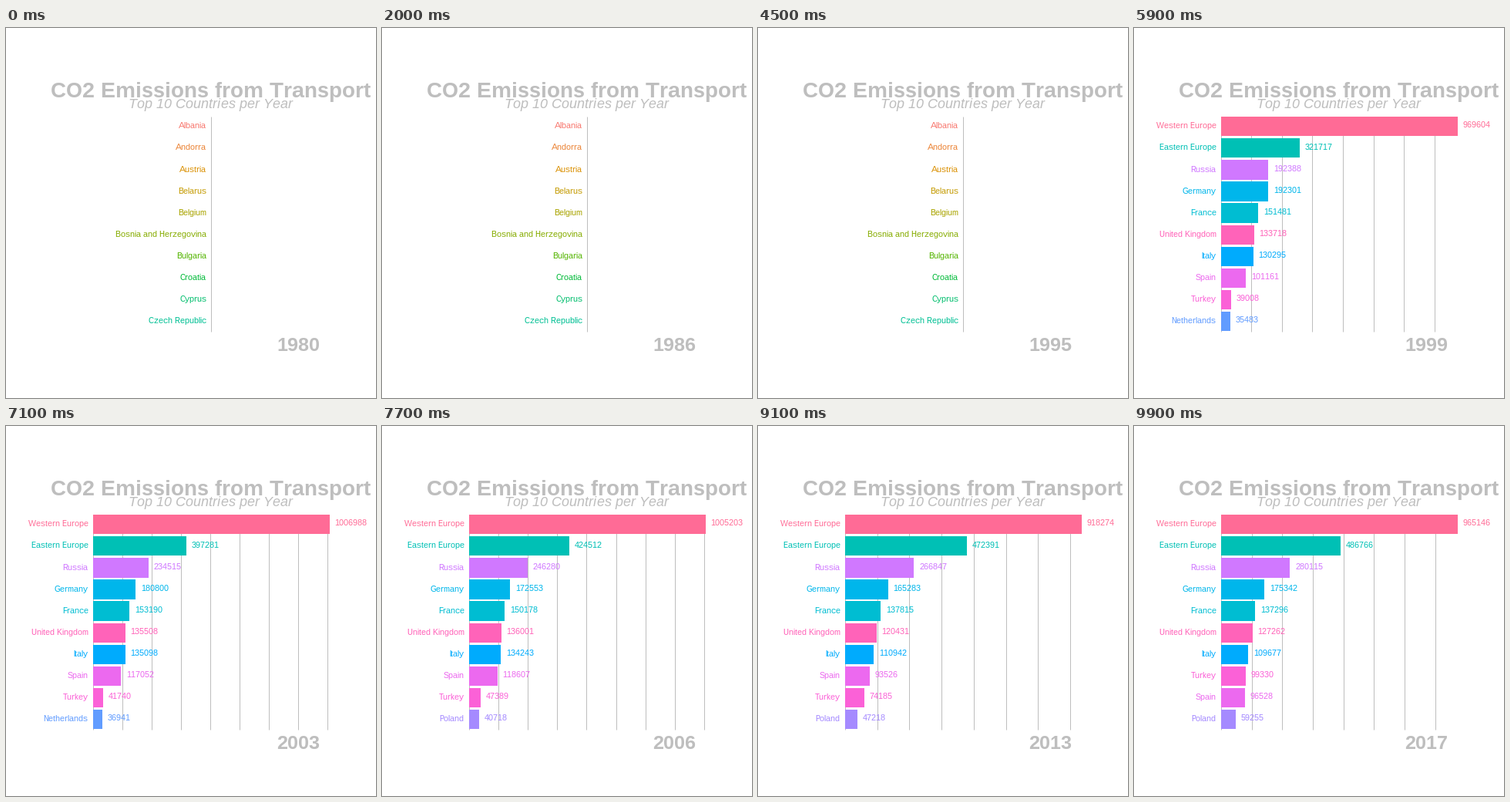
Write a matplotlib script that moves like this. It is 480 px wide and 480 px high and loops after 10 s.

```python
import numpy as np
import matplotlib.pyplot as plt
from matplotlib.animation import FuncAnimation
from matplotlib.patches import Rectangle

SIZE, FRAMES, ROWS = 480, 100, 10
LEFT, RIGHT, TOP, BOTTOM = 113.4, 420, 115, 394
STEP, BAR = 28.1, 25.3
GREY = "#bebebe"
GRID = 125000
FIRST_DATA = 2000

NAMES = [
    "Albania", "Andorra", "Austria", "Belarus", "Belgium",
    "Bosnia and Herzegovina", "Bulgaria", "Croatia", "Cyprus",
    "Czech Republic", "Eastern Europe", "France", "Germany", "Italy",
    "Netherlands", "Poland", "Russia", "Spain", "Turkey",
    "United Kingdom", "Western Europe",
]

# Emissions at a few key years, linear in between
KEYS = [2000, 2004, 2007, 2009, 2013, 2017]
EMISSIONS = {
    "Western Europe": [969604, 1006988, 1004310, 955662, 918274, 965146],
    "Eastern Europe": [321717, 397281, 438127, 444032, 472391, 486766],
    "Russia": [192388, 234515, 252163, 249208, 266847, 280115],
    "Germany": [192301, 180800, 168429, 161350, 165283, 175342],
    "France": [151481, 153190, 148672, 140924, 137815, 137296],
    "United Kingdom": [133718, 135508, 136247, 126586, 120431, 127262],
    "Italy": [130295, 135098, 133816, 121206, 110942, 109677],
    "Spain": [101161, 117052, 119384, 109041, 93526, 96528],
    "Turkey": [39008, 41740, 50213, 54599, 74185, 99330],
    "Netherlands": [35483, 36941, 38012, 37436, 35127, 34806],
    "Poland": [28914, 33027, 44563, 48097, 47218, 59255],
}


def hcl(hue, chroma=100, light=65):
    """Polar LUV colour, clipped to sRGB."""
    h = np.radians(hue)
    y = ((light + 16) / 116) ** 3
    u = chroma * np.cos(h) / (13 * light) + 0.1978398
    v = chroma * np.sin(h) / (13 * light) + 0.4683363
    x = 9 * y * u / (4 * v)
    z = -x / 3 - 5 * y + 3 * y / v
    rgb = np.array([
        [3.240479, -1.537150, -0.498535],
        [-0.969256, 1.875992, 0.041556],
        [0.055648, -0.204043, 1.057311],
    ]) @ [x, y, z]
    rgb = np.clip(rgb, 0, 1)
    return tuple(np.where(rgb > 0.00304,
                          1.055 * rgb ** (1 / 2.4) - 0.055, 12.92 * rgb))


COLORS = {n: hcl(15 + 360 * i / len(NAMES)) for i, n in enumerate(NAMES)}


def year_at(i):
    """Three frames per year up to 2005, then two."""
    return 1980 + i // 3 if i < 75 else 2005 + (i - 75) // 2


def ranking(year):
    if year < FIRST_DATA:
        return [(n, 0) for n in NAMES[:ROWS]]
    now = {n: round(float(np.interp(year, KEYS, v)))
           for n, v in EMISSIONS.items()}
    return sorted(now.items(), key=lambda kv: -kv[1])[:ROWS]


# whole-pixel glyph widths without kerning
plt.rcParams.update({
    "font.family": "Liberation Sans",
    "text.hinting": "native",
    "text.hinting_factor": 1,
    "text.kerning_factor": 6,
})
fig = plt.figure(figsize=(SIZE / 72, SIZE / 72), dpi=72, facecolor="white")
ax = fig.add_axes([0, 0, 1, 1])
ax.set(xlim=(0, SIZE), ylim=(SIZE, 0))
ax.axis("off")

mid = (LEFT + RIGHT) / 2
ax.text(mid - 1.2, 90, "CO2 Emissions from Transport", ha="center",
        fontsize=28, weight="bold", color=GREY)
ax.text(mid - 1.2, 104, "Top 10 Countries per Year", ha="center",
        fontsize=18, style="italic", color=GREY)
year_text = ax.text(379.5, 419, "", ha="center", fontsize=25,
                    weight="bold", color=GREY)

grid = [ax.plot([0, 0], [TOP, BOTTOM], color=GREY, lw=1, zorder=1,
                solid_capstyle="butt")[0] for _ in range(9)]
bars, names, values = [], [], []
for k in range(ROWS):
    y = k * STEP
    bar = Rectangle((LEFT, TOP + y), 0, BAR, lw=0, zorder=2, snap=True)
    bars.append(ax.add_patch(bar))
    names.append(ax.text(0, 130.4 + y, "", ha="right", fontsize=11))
    values.append(ax.text(0, 129.4 + y, "", ha="left", fontsize=11))


def draw(i):
    year_text.set_text(str(year_at(i)))
    # bars run one step ahead of the year caption
    rows = ranking(year_at(min(i + 1, FRAMES - 1)))
    top = rows[0][1]
    zero = LEFT if top else mid
    scale = (RIGHT - LEFT) / top if top else 0

    for j, line in enumerate(grid):
        x = zero + j * GRID * scale - 0.5
        line.set_xdata([x, x])
        line.set_visible(j * GRID <= top)

    for (name, value), bar, label, number in zip(rows, bars, names, values):
        color = COLORS[name]
        bar.set_width(value * scale)
        bar.set_facecolor(color)
        bar.set_visible(value > 0)
        label.set(text=name, x=zero - 6.7, color=color)
        number.set(text=str(value) if value else "",
                   x=zero + value * scale + 6.7, color=color)
    return [year_text, *grid, *bars, *names, *values]


anim = FuncAnimation(fig, draw, frames=FRAMES, init_func=lambda: draw(0),
                     interval=100, repeat=True, repeat_delay=0)
plt.show()
```
